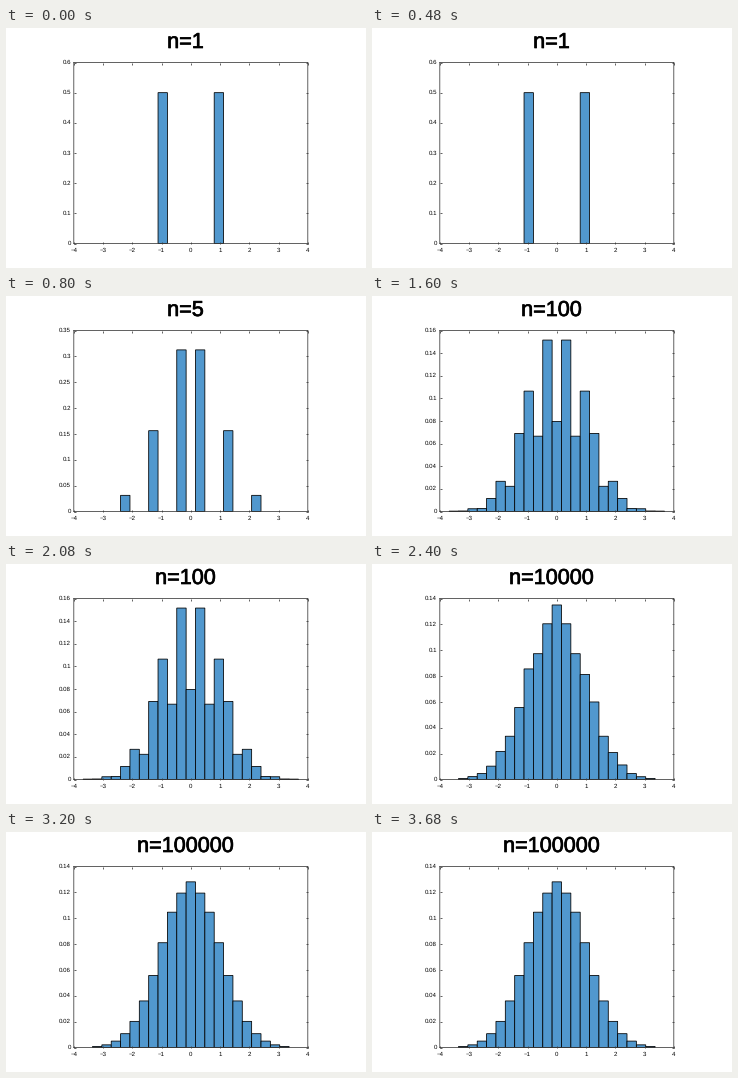
Write a matplotlib script that moves like this. It is 360x240 px and loops after 4000 ms.

```python
import numpy as np
import matplotlib.pyplot as plt
from matplotlib import patheffects
from matplotlib.animation import FuncAnimation

W, H, DPI = 360, 240, 100
LEFT, RIGHT, TOP, BOTTOM = 67.8, 301.8, 34.5, 215.5
PX = 72 / DPI  # points per pixel
BINS = 25
EDGES = np.linspace(-4, 4, BINS + 1)
RAREST = 0.0003  # bars less likely than this stay hidden
GREY = "#3c3c3c"

# number of coin flips, y limit, y tick step
STAGES = [(1, 0.6, 0.1), (5, 0.35, 0.05), (100, 0.16, 0.02),
          (10000, 0.14, 0.02), (100000, 0.14, 0.02)]

plt.rcParams["text.hinting"] = "no_hinting"


def binned_walk(n):
    """Distribution of the sum of n flips of +-1, divided by sqrt(n)."""
    k = np.arange(n + 1)
    log_fact = np.concatenate([[0], np.cumsum(np.log(k[1:]))])
    prob = np.exp(log_fact[n] - log_fact - log_fact[::-1] - n * np.log(2))
    return np.histogram((2 * k - n) / np.sqrt(n), EDGES, weights=prob)[0]


HEIGHTS = [binned_walk(n) for n, _, _ in STAGES]

fig = plt.figure(figsize=(W / DPI, H / DPI), dpi=DPI, facecolor="white")
ax = fig.add_axes([LEFT / W, 1 - BOTTOM / H, (RIGHT - LEFT) / W, (BOTTOM - TOP) / H])


def style_axis(axis):
    for label in axis.get_ticklabels():
        label.set(family="Liberation Sans", size=6.2 * PX, color="black")
    for line in axis.get_ticklines():
        line.set_snap(False)


def draw(i):
    n, top, step = STAGES[i]
    ax.clear()
    shown = HEIGHTS[i] > RAREST
    ax.bar(EDGES[:-1][shown], HEIGHTS[i][shown], width=8 / BINS, align="edge",
           facecolor="#5198ce", edgecolor="black", linewidth=0.8 * PX, snap=False)

    ticks = np.arange(round(top / step) + 1) * step
    ax.set(xlim=(-4, 4), ylim=(0, top))
    ax.set_xticks(range(-4, 5), [f"{x}".replace("-", "\u2212") for x in range(-4, 5)])
    ax.set_yticks(ticks, [f"{t:.4g}" for t in ticks])
    ax.tick_params(direction="in", top=True, right=True, length=2.4 * PX,
                   width=0.8 * PX, color=GREY)
    ax.tick_params(axis="x", pad=4 * PX)
    ax.tick_params(axis="y", pad=3 * PX)
    for label in ax.get_yticklabels():
        label.set_verticalalignment("center")
    style_axis(ax.xaxis)
    style_axis(ax.yaxis)
    for spine in ax.spines.values():
        spine.set(linewidth=0.8 * PX, color=GREY, snap=False)

    title = ax.text(179.5 / W, 1 - 20 / H, f"n={n}", transform=fig.transFigure,
                    family="Liberation Sans", size=21.6 * PX, ha="center",
                    va="baseline", color="black")
    title.set_path_effects([patheffects.withStroke(linewidth=0.7 * PX,
                                                   foreground="black")])
    return []


anim = FuncAnimation(fig, draw, frames=len(STAGES), init_func=lambda: [],
                     interval=800, repeat=True, repeat_delay=0, blit=False)
plt.show()
```
